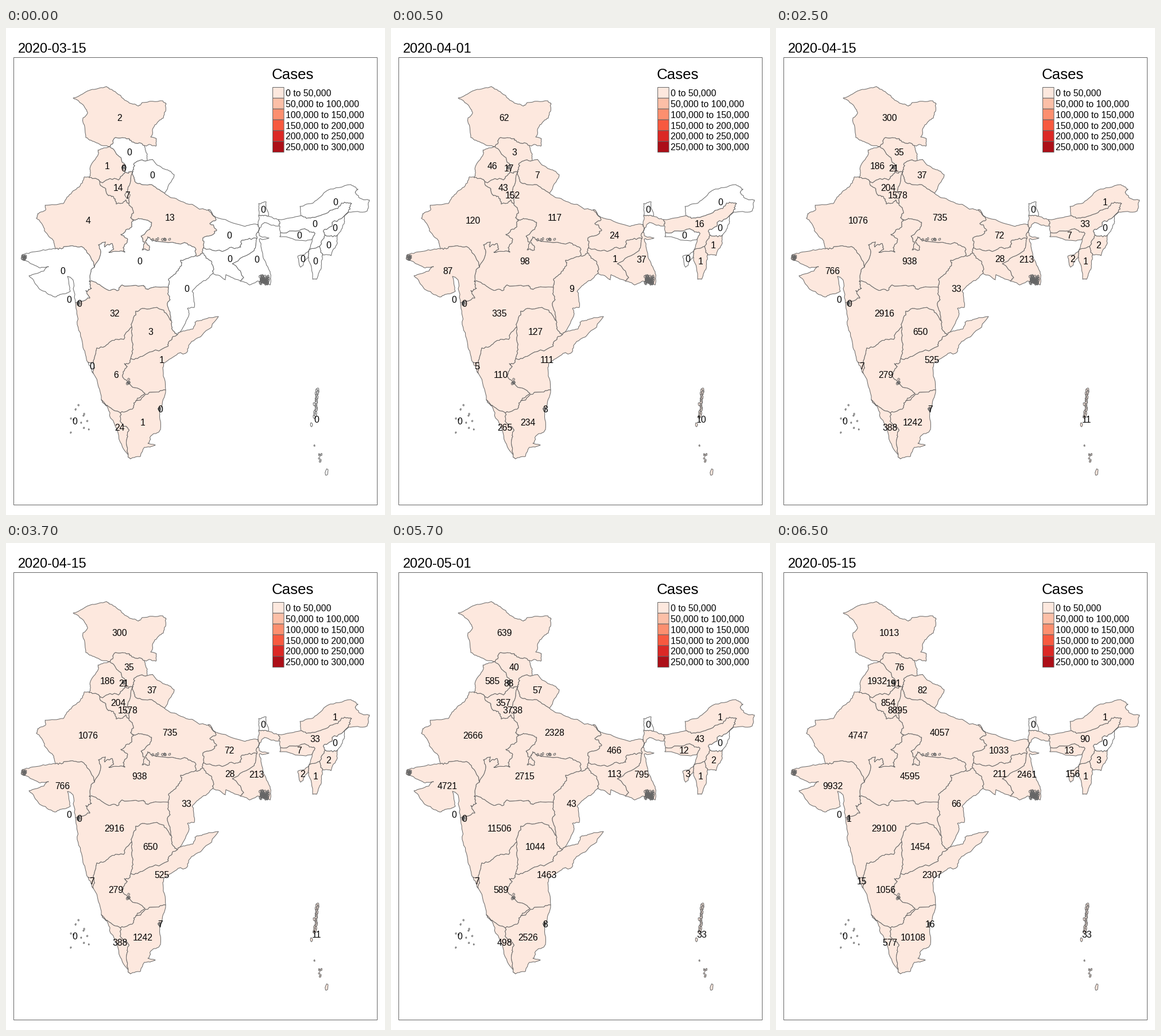
Animation, 660 px wide and 849 px high, one loop 8000 ms. Source, as a matplotlib script:

```python
import numpy as np
import matplotlib.pyplot as plt
from matplotlib.animation import FuncAnimation
from matplotlib.patches import Polygon, Rectangle

WIDTH, HEIGHT, DPI = 660, 849, 64
PT = 72 / DPI
GREY, SHADE = "#666666", "#fde8de"
DATES = ["2020-03-15", "2020-04-01", "2020-04-15", "2020-05-01", "2020-05-15"]
CHANGES = [1, 5, 9, 13]
LEGEND = [SHADE, "#fcbfa7", "#fc8f6f", "#f7593f", "#db2825", "#ac0f18"]

plt.rcParams["font.family"] = "Liberation Sans"
fig = plt.figure(figsize=(WIDTH / DPI, HEIGHT / DPI), dpi=DPI, facecolor="white")
ax = fig.add_axes([0, 0, 1, 1])
ax.set(xlim=(0, WIDTH), ylim=(HEIGHT, 0))
ax.axis("off")

rng = np.random.default_rng(15)
arcs, states = [], []


def roughen(points, strength, passes=3):
    """Midpoint displacement: turns a few key points into a natural border."""
    for _ in range(passes):
        step = np.diff(points, axis=0)
        length = np.hypot(*step.T)[:, None]
        normal = step[:, ::-1] * (1, -1) / np.sqrt(length)
        merged = np.empty((2 * len(points) - 1, 2))
        merged[::2] = points
        merged[1::2] = points[:-1] + step / 2 + normal * rng.normal(0, strength, length.shape)
        points = merged
    return points


def arc(owners, *xy):
    """A border shared by the states named, or the outer edge of one."""
    owners = owners.split()
    points = np.array(xy, float).reshape(-1, 2)
    arcs.append((owners, roughen(points, 0.36 if len(owners) > 1 else 0.22)))


def ring(code):
    """Join all arcs of a state end to end."""
    parts = [line for owners, line in arcs if code in owners]
    path = parts.pop(0)
    while parts:
        for i, part in enumerate(parts):
            if np.array_equal(part[-1], path[-1]):
                part = part[::-1]
            if np.array_equal(part[0], path[-1]):
                path = np.vstack([path, part[1:]])
                parts.pop(i)
                break
        else:
            raise ValueError(f"open outline: {code}")
    return path


def centroid(path):
    following = np.roll(path, -1, axis=0)
    cross = path[:, 0] * following[:, 1] - following[:, 0] * path[:, 1]
    return ((path + following) * cross[:, None]).sum(axis=0) / (3 * cross.sum())


def outline(path, fill="none", order=1):
    return ax.add_patch(Polygon(path, fc=fill, ec=GREY, lw=PT, joinstyle="round", zorder=order))


def label(x, y, text, px, **style):
    return ax.text(x, y, text, fontsize=px * PT, va="baseline", zorder=5, **style)


def territory(shapes, x, y, counts):
    """Counts line up with the last dates; earlier ones are zero."""
    counts = (0,) * (len(DATES) - len(counts)) + counts
    fills = [outline(shape) for shape in shapes]
    states.append((counts, fills, label(x, y + 5.6, "", 15.8, ha="center")))


def state(code, *counts):
    path = ring(code)
    territory([path], *centroid(path), counts)


def islet(x, y, w, h):
    turn = np.linspace(0, 2 * np.pi, 9)[:-1]
    size = rng.uniform(0.6, 1.1, 8) / 2
    return np.column_stack([x + w * size * np.cos(turn), y + h * size * np.sin(turn)])


def thicket(x, y, w, h, count):
    """Dense tangle of tiny channels and islets."""
    for cx, cy in rng.random((count, 2)) * (w, h) + (x, y):
        outline(islet(cx, cy, 4, 5), order=3)


# North
arc("JK", 241,205, 250,203, 261,206, 262,193, 252,190, 259,169, 274,157, 279,132, 273,127, 237,130,
    230,136, 207,126, 184,107, 175,102, 150,107, 117,122, 133,133, 142,147, 134,157, 139,191, 157,200, 181,207)
arc("JK HP", 181,207, 191,191, 213,193, 222,199, 241,205)
arc("HP", 241,205, 246,220, 246,231)
arc("HP UK", 246,231, 223,236, 221,250)
arc("HP PB", 181,207, 197,224, 207,251)
arc("HP HR", 207,251, 221,250)
arc("PB", 181,207, 160,213, 161,219, 146,246, 145,261)
arc("PB RJ", 145,261, 160,264)
arc("PB HR", 160,264, 168,270, 196,265, 207,251)
arc("HR RJ", 160,264, 174,281, 176,290, 187,294, 192,307, 208,300, 214,307)
arc("HR UP", 221,250, 212,282, 214,307)
arc("UK", 246,231, 255,229, 273,245, 293,256, 276,288)
arc("UK UP", 221,250, 224,267, 250,273, 276,288)
arc("UP", 276,288, 300,300, 337,316, 352,317)
arc("UP BR", 352,317, 366,334, 355,341, 367,352, 362,359, 343,366, 344,383)
arc("UP JH", 344,383, 342,392)
arc("UP CG", 342,392, 330,397)
arc("UP MP", 330,397, 329,383, 311,374, 254,369, 247,364, 243,372, 250,387, 237,387, 241,373,
    235,363, 253,345, 250,337, 236,333, 222,334)
arc("UP RJ", 214,307, 222,321, 217,331, 222,334)
arc("RJ", 145,261, 136,260, 133,270, 115,286, 100,306, 68,309, 69,317, 55,324, 53,332, 67,350,
    82,370, 86,385)
arc("RJ GJ", 86,385, 106,381, 131,381, 146,397, 154,417)
arc("RJ MP", 154,417, 165,392, 161,378, 173,373, 172,382, 185,376, 187,384, 179,391, 207,391,
    204,383, 212,369, 200,360, 219,347, 222,334)

# Centre and west
arc("GJ", 86,385, 58,389, 28,395, 27,403, 58,418, 74,416, 65,424, 40,432, 58,455, 85,469,
    104,463, 112,459, 107,433, 117,440, 121,479)
arc("GJ MP", 154,417, 145,442)
arc("GJ MH", 121,479, 146,471, 139,458, 149,454, 145,442)
arc("MP MH", 145,442, 172,454, 193,458, 202,448, 240,449, 247,456, 283,452)
arc("MP CG", 283,452, 283,438, 296,428, 306,414, 304,405, 330,397)
arc("MH CG", 283,452, 286,474, 281,480, 288,511)
arc("CG JH", 342,392, 352,403, 361,417, 360,428)
arc("CG", 360,428, 342,442, 324,459, 328,487, 316,489, 319,498, 303,530)
arc("CG AP", 303,530, 298,535)
arc("TG CG", 288,511, 291,528, 298,535)
arc("MH TG", 219,521, 222,505, 237,489, 271,491, 288,511)
arc("MH", 121,479, 124,517, 134,557, 143,583)
arc("MH GA", 143,583, 152,583)
arc("GA", 143,583, 152,602)
arc("GA KA", 152,583, 152,602)
arc("MH KA", 152,583, 158,558, 183,546, 205,543, 219,521)

# South
arc("KA TG", 217,576, 221,551, 219,521)
arc("TG AP", 217,576, 240,571, 282,555, 283,548, 298,535)
arc("KA AP", 226,650, 242,637, 218,624, 205,611, 211,590, 206,585, 217,576)
arc("AP", 303,530, 325,525, 329,513, 344,508, 370,503, 341,536, 319,552, 313,567, 300,567,
    275,584, 273,592, 278,631)
arc("AP TN", 278,631, 254,635, 226,650)
arc("KA TN", 226,650, 222,662, 199,671)
arc("KA KL", 199,671, 180,661, 166,648)
arc("KA", 152,602, 166,648)
arc("KL", 166,648, 182,680, 199,722, 217,751)
arc("TN KL", 217,751, 211,714, 213,699, 204,693, 199,671)
arc("TN", 278,631, 268,664, 269,700, 255,709, 247,724, 260,727, 241,731, 234,747, 217,751)

# East
arc("BR", 352,317, 363,329, 413,345, 438,343)
arc("BR WB", 438,343, 441,350, 437,367)
arc("JH BR", 344,383, 387,385, 409,382, 411,370, 437,367)
arc("JH WB", 437,367, 432,388, 394,411, 413,434, 408,441)
arc("JH", 360,428, 382,439, 383,430, 408,441)
arc("WB", 438,343, 440,327)
arc("WB SK", 440,327, 457,328)
arc("WB", 457,328, 475,334)
arc("WB AS", 475,334, 476,345)
arc("WB", 476,345, 450,339, 441,350, 441,362, 458,366, 441,368, 448,401, 460,425, 460,448,
    439,441, 424,448, 408,441)
arc("SK", 440,327, 440,306, 453,303, 457,328)
arc("AS", 475,334, 514,327)
arc("AS AR", 514,327, 533,330, 569,317, 583,308, 602,306, 596,321)
arc("AR", 514,327, 512,311, 535,305, 560,283, 600,273, 613,281, 608,287, 617,297, 633,300,
    629,319, 596,321)
arc("AS NL", 596,321, 568,339, 553,353, 556,361)
arc("NL", 596,321, 590,327, 589,341, 577,361)
arc("NL MN", 577,361, 556,361)
arc("AS MN", 556,361, 546,381)
arc("MN", 577,361, 577,375, 566,397, 551,396)
arc("MN MZ", 546,381, 551,396)
arc("AS MZ", 546,381, 527,389)
arc("MZ", 551,396, 549,414, 541,438, 534,438, 527,400)
arc("MZ TR", 527,389, 527,400)
arc("TR", 527,389, 508,398, 513,417, 527,400)
arc("AS", 527,389, 533,369)
arc("AS ML", 533,369, 538,358, 520,350, 478,357)
arc("AS", 478,357, 476,345)
arc("ML", 478,357, 477,364, 521,371, 533,369)

state("JK", 2, 62, 300, 639, 1013)
state("HP", 3, 35, 40, 76)
state("PB", 1, 46, 186, 585, 1932)
state("UK", 7, 37, 57, 82)
state("HR", 14, 43, 204, 357, 854)
state("RJ", 4, 120, 1076, 2666, 4747)
state("UP", 13, 117, 735, 2328, 4057)
state("MP", 98, 938, 2715, 4595)
state("BR", 24, 72, 466, 1033)
state("SK")
state("WB", 37, 213, 795, 2461)
state("JH", 1, 28, 113, 211)
state("AS", 16, 33, 43, 90)
state("AR", 1, 1, 1)
state("NL")
state("MN", 1, 2, 2, 3)
state("MZ", 1, 1, 1, 1)
state("TR", 2, 3, 156)
state("ML", 7, 12, 13)
state("GJ", 87, 766, 4721, 9932)
state("MH", 32, 335, 2916, 11506, 29100)
state("CG", 9, 33, 43, 66)
state("TG", 3, 127, 650, 1044, 1454)
state("AP", 1, 111, 525, 1463, 2307)
state("KA", 6, 110, 279, 589, 1056)
state("GA", 5, 7, 7, 15)
state("KL", 24, 265, 388, 498, 577)
state("TN", 1, 234, 1242, 2526, 10108)

# Small territories and islands
territory([islet(205, 243, 8, 9)], 205, 244, (17, 21, 88, 191))
territory([islet(211, 291, 11, 13)], 212, 291, (7, 152, 1578, 3738, 8895))
territory([], 109.5, 473, ())
territory([islet(127, 480, 8, 9)], 127.5, 480.5, (1,))
territory([islet(267, 664, 6, 7)], 268.5, 664.5, (3, 7, 8, 16))

atolls = rng.uniform((101, 657), (148, 707), (11, 2))
territory([islet(x, y, 2.5, 3) for x, y in atolls], 120, 685, ())

chain = [islet(542 - 0.1 * dy + rng.normal(0, 1.5), 630 + dy, 4, 7) for dy in range(0, 50, 2)]
chain += [islet(532, 692, 4, 10), islet(558.5, 775, 6, 13), islet(537, 728, 3, 3)]
chain += [islet(x, y, 3, 4) for x, y in rng.uniform((545, 742), (555, 756), (6, 2))]
territory(chain, 541, 682.5, (10, 11, 33, 33))

thicket(442, 432, 16, 14, 50)
thicket(28, 397, 6, 7, 12)
thicket(249, 367, 38, 3, 8)
thicket(210, 612, 8, 8, 6)
for x, y in [(205, 243), (127, 480), (267, 664)]:
    thicket(x - 2, y - 2, 3, 4, 3)

ax.add_patch(Rectangle((13.5, 51.5), 633, 780, fill=False, ec=GREY, lw=PT, snap=False, zorder=4))

label(463, 89, "Cases", 25.9)
for i, color in enumerate(LEGEND):
    top = 103.5 + 18.85 * i
    ax.add_patch(Rectangle((464.5, top), 19.5, 18.85, fc=color, ec=GREY, lw=PT, snap=False, zorder=4))
    low, high = 50 * i, 50 * (i + 1)
    label(487.3, top + 15.5, f"{low},000 to {high},000" if low else f"0 to {high},000", 15.8)
date = label(20.5, 42.6, "", 23.5)


def update(frame):
    step = int(np.searchsorted(CHANGES, frame, side="right"))
    date.set_text(DATES[step])
    for counts, fills, text in states:
        text.set_text(str(counts[step]))
        for fill in fills:
            fill.set_facecolor(SHADE if counts[step] else "white")
    return []


animation = FuncAnimation(fig, update, frames=16, interval=500, repeat=True, blit=False)
plt.show()
```
